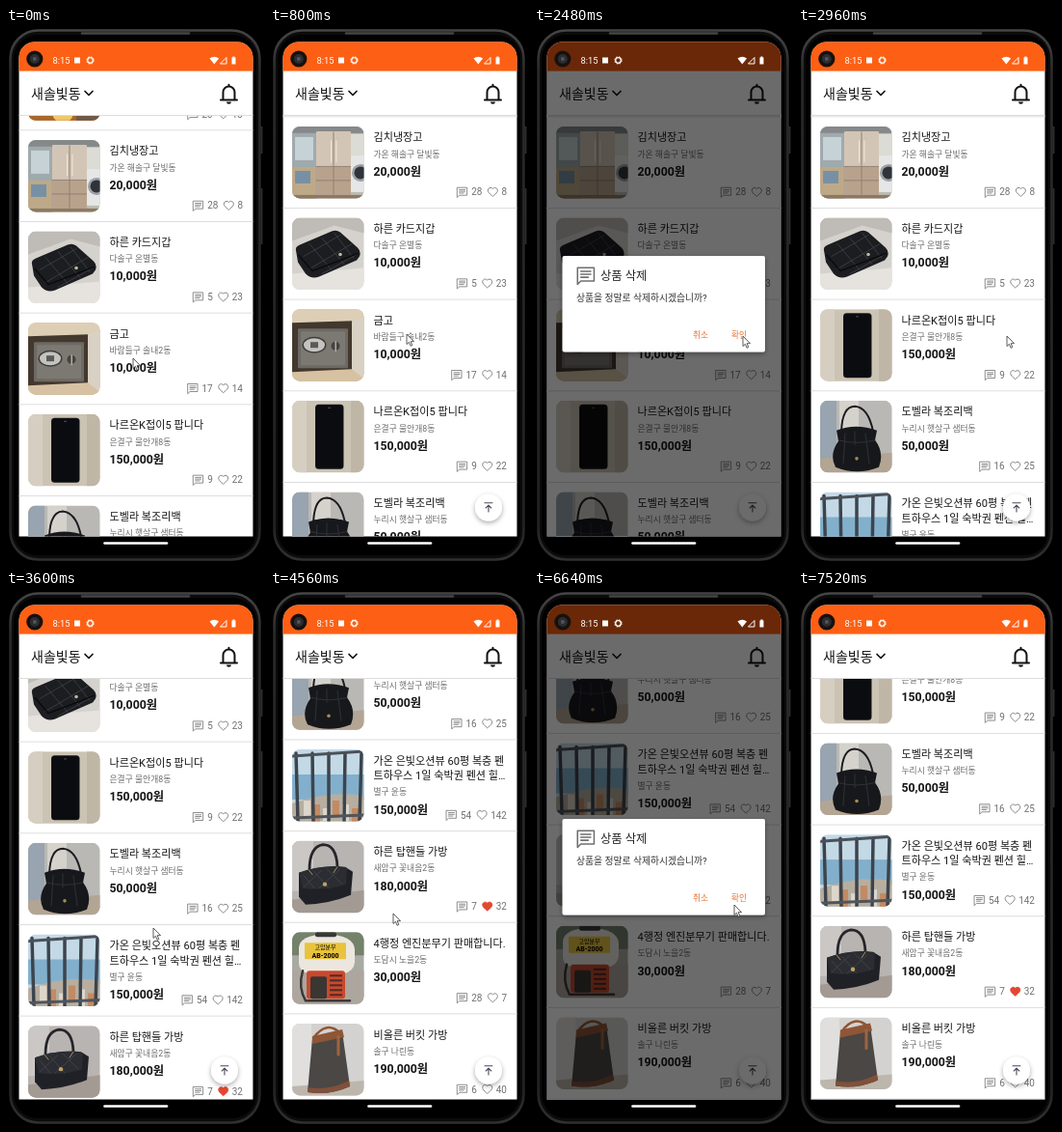
An HTML page that plays this animation: 268 by 554 pixels, repeating every 7.68 s.

```html
<!DOCTYPE html>
<html lang="ko">
<head>
<meta charset="utf-8">
<title>중고 거래 목록</title>
<style>
  html, body { margin: 0; width: 100%; height: 100%; overflow: hidden; background: #000; }
  svg { display: block; width: 268px; height: 554px; }
  text { font-family: Roboto, "Noto Sans CJK KR", "Noto Sans CJK", sans-serif; white-space: pre; }
  .title { font-size: 11.1px; fill: #151515; }
  .place { font-size: 8.8px; fill: #6c6c6c; }
  .price { font-size: 12.3px; font-weight: 700; fill: #151515; }
  .count { font-size: 10px; fill: #707070; text-anchor: end; }
  .button { font-size: 8.7px; fill: #e8702f; text-anchor: middle; }
  .line { fill: none; stroke-linecap: round; stroke-linejoin: round; }
</style>
</head>
<body>
<svg viewBox="0 0 268 554">
  <defs>
    <clipPath id="screen"><path d="M13.5 526.5V30.5a16 16 0 0 1 16-16H240.5a16 16 0 0 1 16 16V526.5z"/></clipPath>
    <clipPath id="list"><rect x="13" y="90" width="244" height="437"/></clipPath>
    <clipPath id="thumb"><rect width="74.5" height="74.5" rx="8"/></clipPath>
    <linearGradient id="edge" x2="0" y2="1">
      <stop stop-color="#454545"/><stop offset=".08" stop-color="#2b2b2b"/>
      <stop offset=".93" stop-color="#242424"/><stop offset="1" stop-color="#303030"/>
    </linearGradient>
    <filter id="shadow" x="-40%" y="-40%" width="180%" height="180%">
      <feDropShadow dx="0" dy="2" stdDeviation="2.8" flood-opacity=".34"/>
    </filter>
    <path id="heart" d="M12 21l-1.45-1.3C5.4 15.4 2 12.3 2 8.5 2 5.4 4.4 3 7.5 3c1.7 0 3.4.8 4.5 2.1C13.1 3.8 14.8 3 16.5 3 19.6 3 22 5.4 22 8.5c0 3.8-3.4 6.9-8.6 11.2z" stroke-width="1.9"/>
    <path id="chat" d="M2 2h20v16H6l-4 4zM6 6.5h12M6 10h12M6 13.5h9" class="line" stroke-width="1.8"/>
  </defs>

  <rect width="268" height="554"/>
  <path d="M265.5 102v28M265.5 166v58" stroke="#2c2c2c" stroke-width="2"/>
  <rect x="4.5" y="2.5" width="259" height="548" rx="29" fill="#0b0b0b" stroke="url(#edge)" stroke-width="2.5"/>
  <rect x="8" y="7" width="252" height="539" rx="25"/>
  <path d="M79 5.5H190" stroke="#444" stroke-width="2.5" stroke-linecap="round"/>

  <g clip-path="url(#screen)">
    <rect x="13" y="14" width="244" height="513" fill="#fff"/>
    <g id="rows" clip-path="url(#list)"></g>
    <rect x="13" y="14" width="244" height="30.6" fill="#fd6014"/>
    <path d="M13 90.5H257" stroke="#ddd"/>
    <text x="26" y="73" font-size="14" font-weight="500" fill="#111">새솔빛동</text>
    <path d="M82 65.5l4 4 4-4" class="line" stroke="#111" stroke-width="1.7"/>
    <path d="M223 74.5h17M225.5 74V66.5a6 6 0 0 1 12 0V74M231.5 60v-1.2" class="line" stroke="#111" stroke-width="2"/>
    <path d="M229 76.5h5a2.5 2.2 0 0 1-5 0z" fill="#111"/>
    <g id="fab">
      <circle cx="227" cy="496.5" r="14" fill="#fff" filter="url(#shadow)"/>
      <path d="M223 491.8h8M227 501V494.6M224.2 497l2.8-2.800 2.8 2.8" class="line" stroke="#4a4a5c" stroke-width="1.1"/>
    </g>
    <rect id="dim" x="13" y="14" width="244" height="513"/>
    <g id="dialog">
      <rect x="29.5" y="236" width="210.5" height="99.5" rx="2" fill="#fff" filter="url(#shadow)"/>
      <use href="#chat" transform="translate(43.5 246.5) scale(.86)" stroke="#707070"/>
      <text x="69" y="260.5" font-size="12.3" fill="#222">상품 삭제</text>
      <text x="44" y="282.7" font-size="9.8" fill="#333">상품을 정말로 삭제하시겠습니까?</text>
      <text x="173" y="321.3" class="button">취소</text>
      <text x="213" y="321.3" class="button">확인</text>
    </g>
  </g>

  <g fill="#fff">
    <text x="48.5" y="36.7" font-size="9.3">8:15</text>
    <rect x="71" y="30.5" width="6" height="6"/>
    <circle cx="87.5" cy="33.5" r="2.8" fill="none" stroke="#fff" stroke-width="1.3"/>
    <circle cx="87.5" cy="33.5" r="3.8" fill="none" stroke="#fff" stroke-width=".8" stroke-dasharray="1.5 1.5"/>
    <path d="M211.5 31.5q4.800-3.600 9.600 0l-4.800 6z"/>
    <path d="M222.5 37l6.5-6.5V37z" fill="none" stroke="#fff"/>
    <path d="M234.5 30.5h1v-1h2v1h1V37.5h-4z"/>
    <path d="M102.5 533.5H167" stroke="#fff" stroke-width="2.6" stroke-linecap="round"/>
  </g>
  <circle cx="29.8" cy="32" r="8.6" fill="#17110e"/>
  <circle cx="29.8" cy="32" r="5" fill="#2b2d30"/>
  <circle cx="29.8" cy="32" r="2" fill="#50565c"/>
  <path id="cursor" d="M0 0V10.500l2.400-2.200 1.700 4 1.700-.8-1.700-3.800h3.400z" fill="#fff" stroke="#333" stroke-width=".8" stroke-linejoin="round"/>
</svg>

<script>
const LOOP = 7680, STEP = 80, PITCH = 94.65, TOP = 101.9;
const $ = id => document.getElementById(id);

// Drawing helpers for the thumbnails
const box = (x, y, w, h, fill, r = 0) => `<rect x="${x}" y="${y}" width="${w}" height="${h}" rx="${r}" fill="${fill}"/>`;
const dot = (x, y, r, fill) => `<circle cx="${x}" cy="${y}" r="${r}" fill="${fill}"/>`;
const shape = (d, fill) => `<path d="${d}" fill="${fill}"/>`;
const line = (d, stroke, w = 1) => `<path d="${d}" class="line" stroke="${stroke}" stroke-width="${w}"/>`;
const fill = color => box(0, 0, 75, 75, color);
const bars = (n, fn) => Array.from({ length: n }, (_, i) => fn(i)).join('');

const art = {
  toy: fill('#c98a3c') + box(0, 60, 75, 15, '#a8672c') + dot(36, 66, 11, '#f0c76a') + box(50, 66, 25, 9, '#6f5a48'),
  fridge: fill('#bdbcb2') + box(0, 0, 75, 7, '#85898a') + box(0, 7, 26, 68, '#9faaad') +
    box(3, 11, 19, 24, '#c6d2d5') + box(0, 42, 24, 33, '#bda987') + box(3, 46, 16, 13, '#7890a5') +
    box(25, 5, 36, 67, '#d3c5b5', 1) + box(25, 42, 36, 29, '#b9a28c') +
    line('M43 6V71M25 41.5H61M25 56H61', '#8e8175') + line('M40.5 15V37M46 15V37', '#efe6da') +
    box(61, 8, 14, 22, '#dcdcd6') + box(61, 30, 14, 38, '#e5e6e6') +
    dot(71, 48, 9, '#9ba1a5') + dot(71, 48, 6.5, '#30343a') + box(0, 71, 75, 4, '#8d7963'),
  wallet: fill('#d5d2cd') + shape('M0 0H75V16L44 8 0 24z', '#bfbbb6') + shape('M0 58L75 52V75H0z', '#e6e3de') +
    shape('M4 34Q3 30 8 28L41 14Q46 12 50 15L68 31Q72 35 70 40L67 44 28 61Q20 64 14 58L6 46z', '#1c1d21') +
    line('M12 40L50 18M18 53L62 27M31 58L67 38M18 27L41 54M31 21L54 48M44 16L64 42', '#41434a', .8) +
    line('M7 39L21 55 68 37', '#090a0c', 1.4) + dot(50, 38, 1.8, '#bdb6a6'),
  safe: fill('#bfa580') + shape('M0 0H75V13L0 16z', '#ddcfb6') + shape('M0 14L63 12V63L0 66z', '#43382d') +
    box(6, 20, 52, 41, '#6d6964', 1) + box(9, 23, 46, 35, '#7c7872', 1) +
    '<ellipse cx="23" cy="37" rx="12.5" ry="8.5" fill="#3f3d3b"/><ellipse cx="23" cy="37" rx="11" ry="7" fill="#c3c3bf"/>' +
    box(19, 34, 8, 6, '#5c5a58') + dot(45, 38, 4.5, '#454340') + box(44.5, 33, 1.5, 11, '#b0aea9') +
    shape('M62 12L75 8V75L62 64z', '#d9d1c3') + shape('M0 65L62 62 75 72V75H0z', '#d6c2a2'),
  phone: fill('#cbc3b3') + box(0, 0, 15, 75, '#d6cfc1') + box(61, 0, 14, 75, '#bfb6a5') +
    box(24, 4, 29.5, 67, '#15161a', 3.5) + box(25, 5, 27.5, 65, '#0b0c0f', 3) + box(37, 7, 3, 1.2, '#434850', .6),
  pouch: fill('#bab8b4') + box(0, 0, 17, 62, '#98a4af') + box(20, 0, 20, 42, '#d5d2cc') +
    shape('M0 60L75 54V75H0z', '#b3a593') + line('M22 32Q23 6 36 6Q50 7 55 32', '#1c1c20', 2) +
    shape('M17 31Q37 23 59 31L57 41Q67 54 61 69Q38 78 16 69Q9 56 19 42z', '#17181c') +
    line('M26 34L24 65M36 32V46M47 34L51 65M19 41Q38 46 57 41', '#2f3138') + dot(38, 60, 1.8, '#a18b56'),
  ocean: fill('#c3d9e6') + box(0, 26, 75, 26, '#82b0cc') + shape('M0 56Q40 42 75 48V75H0z', '#b7aea0') +
    bars(6, i => box(12 + i * 10, 53 + i % 3 * 4, 7, 18, i % 2 ? '#c38a63' : '#dcd6ca')) +
    bars(5, i => line(`M${4 + i * 17} 4L${6 + i * 16} 75`, '#3d444d', 3.5)) +
    line('M0 7L75 2', '#4b5159', 3) + line('M0 71L75 68', '#50555b', 3),
  handbag: fill('#b8b4b1') + box(0, 0, 22, 52, '#cac7c4') + shape('M0 61L75 51V75H0z', '#a29a93') +
    line('M18 30Q18 6 32 4Q46 4 47 27', '#25252a', 2.8) +
    shape('M7 33Q32 24 55 27L63 32 61 56Q39 65 14 66L7 58z', '#202126') +
    shape('M7 33Q32 24 57 28L56 45Q35 52 11 49z', '#2b2d33') +
    line('M12 36L23 49M23 32L38 49M36 29L52 45M12 48L30 31M28 49L49 30', '#454850', .8) +
    dot(34, 45, 2.2, '#bca363') + line('M17 30L21 35M47 27L43 33', '#a98f5a'),
  sprayer: fill('#a9aaa4') + box(0, 0, 75, 24, '#74816b') + box(0, 40, 75, 35, '#aca69e') +
    '<path d="M7 16Q8 3 35 2Q64 3 65 18V31Q64 41 53 43H18Q7 41 7 32z" fill="#ebe7de"/>' +
    box(24, 0, 22, 5, '#383936', 2) + box(13, 11, 43, 17, '#e9c33b', 1) +
    '<text x="34.5" y="18" font-size="6" text-anchor="middle">고압분무</text>' +
    '<text x="34.5" y="26.5" font-size="7" font-weight="700" text-anchor="middle">AB-2000</text>' +
    box(15, 40, 40, 29, '#c9482c', 3) + box(19, 46, 17, 23, '#3a3632', 2) +
    bars(5, i => box(39, 44 + i * 5, 13, 2, '#4c2b25')) + line('M11 40Q6 57 14 71H60', '#3b3936', 2.5),
  bucket: fill('#d3d2d0') + box(0, 0, 20, 75, '#e0dfdd') + shape('M0 65L75 59V75H0z', '#bdb6ad') +
    line('M22 15Q36-4 50 10', '#935431', 2.5) + shape('M21 15L52 8 60 65Q38 75 16 71z', '#4a4744') +
    shape('M21 13L52 6 54 14 21 21z', '#8e5636') + shape('M16 66Q38 70 59 59L60 65Q38 75 16 71z', '#80503a') +
    line('M48 13V32', '#9d6440', 3)
};

const items = [
  ['toy', ['어린이 장난감'], '솔구 새내동', '5,000', 23, 13],
  ['fridge', ['김치냉장고'], '가온 해솔구 달빛동', '20,000', 28, 8],
  ['wallet', ['하른 카드지갑'], '다솔구 온별동', '10,000', 5, 23],
  ['safe', ['금고'], '바람들구 솔내2동', '10,000', 17, 14],
  ['phone', ['나르온K접이5 팝니다'], '은결구 물안개8동', '150,000', 9, 22],
  ['pouch', ['도벨라 복조리백'], '누리시 햇살구 샘터동', '50,000', 16, 25],
  ['ocean', ['가온 은빛오션뷰 60평 복층 펜', '트하우스 1일 숙박권 펜션 힐…'], '별구 윤동', '150,000', 54, 142],
  ['handbag', ['하른 탑핸들 가방'], '새암구 꽃내음2동', '180,000', 7, 32, true],
  ['sprayer', ['4행정 엔진분무기 판매합니다.'], '도담시 노을2동', '30,000', 28, 7],
  ['bucket', ['비올른 버킷 가방'], '솔구 나린동', '190,000', 6, 40]
];
const SAFE = 3, SPRAYER = 8;

const label = (cls, x, y, str) => `<text class="${cls}" x="${x}" y="${y}">${str}</text>`;

function rowMarkup([pic, title, place, price, chats, likes, liked]) {
  const wide = n => String(n).length * 5.62;
  const down = (title.length - 1) * 15.6;
  const heartX = 223 - wide(likes) - 15;
  const chatX = heartX - 5 - wide(chats) - 15;
  const paint = liked ? 'fill="#e4472f" stroke="#e4472f"' : 'fill="none" stroke="#808080"';
  return `<g clip-path="url(#thumb)">${art[pic]}</g>` +
    title.map((s, i) => label('title', 84.5, 15.6 + i * 15.6, s)).join('') +
    label('place', 84.5, 31.7 + down, place) +
    label('price', 84.5, 50.9 + down, price + '원') +
    `<use href="#chat" transform="translate(${chatX - .5} 62.3) scale(.5)" stroke="#808080"/>` +
    label('count', heartX - 5, 71.6, chats) +
    `<use href="#heart" transform="translate(${heartX} 62) scale(.5)" ${paint}/>` +
    label('count', 223, 71.6, likes) +
    '<path d="M-10 84.6H234" stroke="#dedede"/>';
}

$('rows').innerHTML = items.map(it => `<g>${rowMarkup(it)}</g>`).join('');
const rows = [...$('rows').children];

// Time, then values
const scrollKeys = [
  [0, -14], [80, -9], [160, -5], [240, -2.5], [320, -1], [400, 0],
  [3200, 0], [3280, 12], [3360, 42], [3440, 80], [3520, 110], [3600, 125],
  [3680, 125], [3920, 172], [4200, 228], [4480, 309], [4560, 316.5], [4720, 321.5], [4880, 323]
];
const cursorKeys = [
  [0, 132, 342], [80, 132, 336.5], [240, 132, 330], [400, 132, 328], [720, 132, 328], [800, 142, 317],
  [1760, 142, 317], [1920, 217, 319], [3040, 217, 319], [3120, 160, 474], [3200, 160, 474],
  [3280, 159, 462], [3360, 157, 432], [3440, 155, 394], [3600, 153, 349], [3680, 153, 349],
  [3920, 150, 302], [4160, 135, 420], [4240, 132, 414], [4480, 128, 341], [4560, 128, 334],
  [5120, 128, 334], [5200, 140, 350], [5280, 140, 350], [5440, 147, 361],
  [6320, 147, 361], [6400, 208, 323], [6560, 208, 325]
];

function track(keys, t) {
  const n = keys.findIndex(k => k[0] > t);
  if (n < 0) return keys[keys.length - 1].slice(1);
  const a = keys[n - 1], b = keys[n], f = (t - a[0]) / (b[0] - a[0]);
  return a.slice(1).map((v, i) => v + (b[i + 1] - v) * f);
}
const ramp = (t, from, to) => Math.min(1, Math.max(0, (t - from) / (to - from)));
const ease = f => f * f * (3 - 2 * f);

function render(t) {
  const gone = [ramp(t, 2520, 2680), ramp(t, 6680, 6840)];
  const shift = [ease(ramp(t, 2640, 2940)), ease(ramp(t, 6800, 7160))];
  // The list is at its end for the second removal, so upper rows come down
  const scroll = track(scrollKeys, t)[0] - shift[1] * PITCH;

  rows.forEach((row, i) => {
    const slot = i - 1 - (i > SAFE ? shift[0] : 0) - (i > SPRAYER ? shift[1] : 0);
    row.setAttribute('transform', `translate(23 ${TOP + slot * PITCH - scroll})`);
  });
  rows[SAFE].setAttribute('opacity', 1 - gone[0]);
  rows[SPRAYER].setAttribute('opacity', 1 - gone[1]);

  const open = t < 4000
    ? ramp(t, 1060, 1300) - ramp(t, 2490, 2680)
    : ramp(t, 5540, 5800) - ramp(t, 6650, 6840);
  const size = .92 + .08 * ease(open);
  $('dim').setAttribute('opacity', .58 * open);
  $('dialog').setAttribute('opacity', open);
  $('dialog').setAttribute('transform', `translate(134.75 285.75) scale(${size}) translate(-134.75 -285.75)`);
  $('fab').setAttribute('opacity', ramp(t, 40, 400));

  const [x, y] = track(cursorKeys, t);
  $('cursor').setAttribute('transform', `translate(${x} ${y})`);
  $('cursor').setAttribute('visibility', t < 7360 ? 'visible' : 'hidden');
}

let start;
function tick(now) {
  start ??= now;
  render(Math.floor(((now - start) % LOOP) / STEP) * STEP);
  requestAnimationFrame(tick);
}
render(0);
requestAnimationFrame(tick);
</script>
</body>
</html>
```
